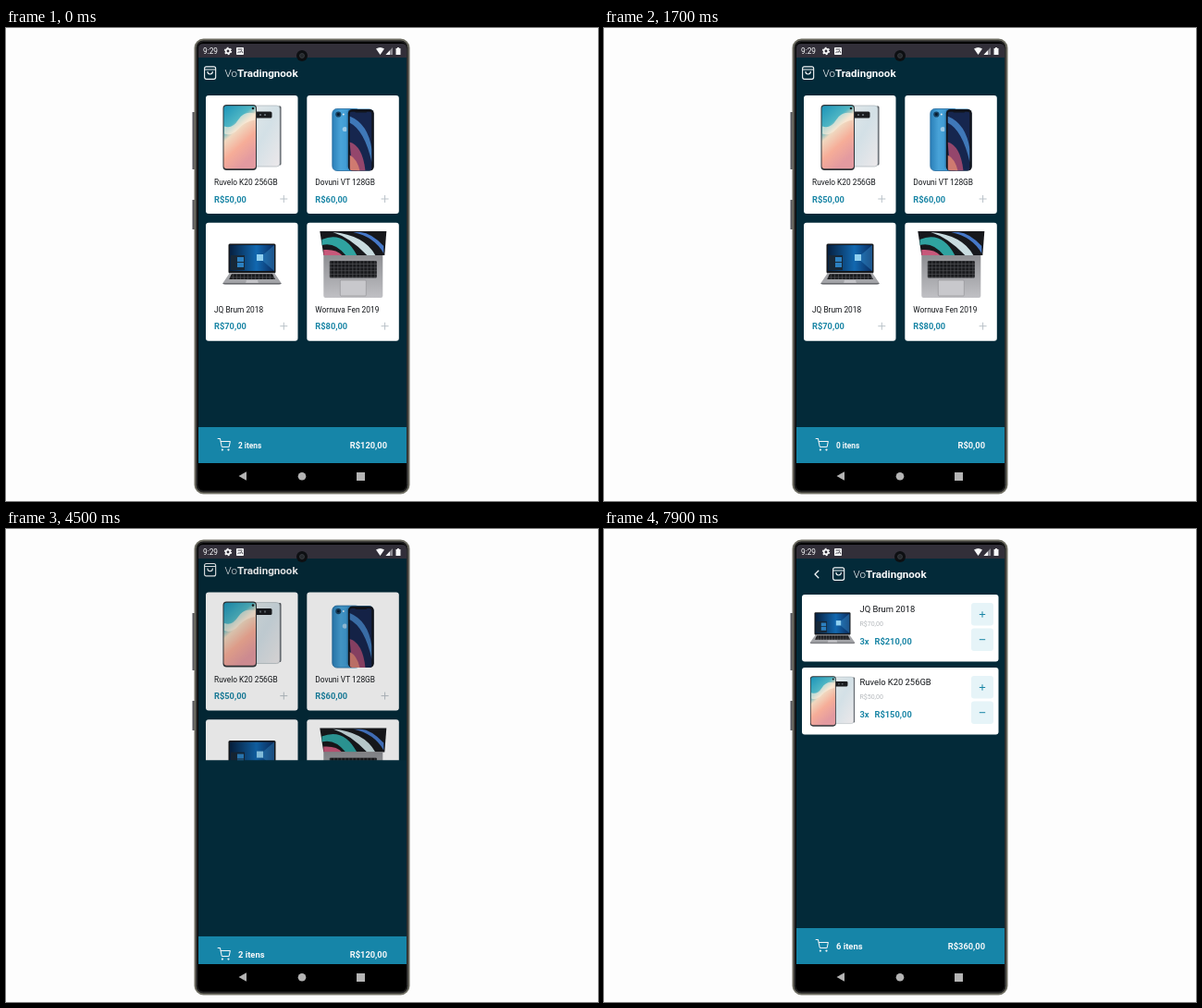
Write an HTML page that moves like this. It is 640 px wide and 512 px high and loops after 8 s.

```html
<!DOCTYPE html>
<html lang="pt-BR">
<head>
<meta charset="utf-8">
<title>Loja</title>
<style>
  html, body { margin: 0; width: 100%; height: 100%; overflow: hidden; background: #fdfdfd; }
  svg { display: block; width: 640px; height: 512px; font-family: Roboto, "Liberation Sans", sans-serif; }
  .icon { fill: none; stroke: #f3f5f7; stroke-width: 1.7; stroke-linecap: round; stroke-linejoin: round; }
  .bold { font-weight: 700; font-size: 9.3px; }
  .price { fill: #1985a5; }
  .light { fill: #f8f9fa; }
  .name { fill: #111418; font-size: 8.35px; }
  .paper { fill: #fff; }
</style>
</head>
<body>
<svg viewBox="0 0 640 512" xmlns="http://www.w3.org/2000/svg">
  <defs>
    <clipPath id="screenClip"><rect x="208" y="32" width="225" height="439"/></clipPath>
    <clipPath id="revealClip"><rect id="reveal" x="208" width="225" height="439"/></clipPath>
    <linearGradient id="beach" x1="0" y1="0" x2=".45" y2="1">
      <stop offset="0" stop-color="#1b93b8"/><stop offset=".34" stop-color="#4fb6c4"/>
      <stop offset=".48" stop-color="#f0d8c0"/><stop offset=".72" stop-color="#f6ad98"/>
      <stop offset="1" stop-color="#e39aa0"/>
    </linearGradient>
    <linearGradient id="pearl" x1="0" y1="0" x2="1" y2="1">
      <stop offset="0" stop-color="#e3e9ea"/><stop offset=".5" stop-color="#d3e0e6"/><stop offset="1" stop-color="#ece8ea"/>
    </linearGradient>
    <linearGradient id="azure" x1="0" x2="1">
      <stop offset="0" stop-color="#2a7fb8"/><stop offset=".3" stop-color="#49a3d8"/><stop offset="1" stop-color="#2c8ac8"/>
    </linearGradient>
    <linearGradient id="desk" x1="0" x2="1">
      <stop offset="0" stop-color="#062040"/><stop offset=".6" stop-color="#1268b0"/><stop offset="1" stop-color="#0a2c60"/>
    </linearGradient>
    <linearGradient id="silver" x1="0" x2="0" y1="0" y2="1">
      <stop offset="0" stop-color="#8d8e92"/><stop offset="1" stop-color="#c0c0c4"/>
    </linearGradient>
    <pattern id="keys" width="4" height="3.6" patternUnits="userSpaceOnUse">
      <rect width="4" height="3.6" fill="#55565a"/><rect width="3.4" height="3" fill="#18191c"/>
    </pattern>
    <clipPath id="glassClip"><rect x="5" y="-29" width="24" height="64" rx="3"/></clipPath>
    <clipPath id="lidClip"><rect x="-34" y="-35" width="68" height="25"/></clipPath>

    <!-- products, centred on the origin -->
    <g id="twoPhones">
      <path d="M29 -34 h1.5 q1 0 1 2 v60 q0 2 -1 2 h-1.5z" fill="#555a60"/>
      <rect x="-5" y="-34.5" width="35" height="66" rx="3.5" fill="url(#pearl)" stroke="#a9b3b8" stroke-width=".7"/>
      <rect x="0" y="-28" width="21.5" height="7" rx="1.5" fill="#191b1e"/>
      <path d="M3 -24.5h2M8 -24.5h2M13 -24.5h2" stroke="#5d646a" stroke-width="2"/>
      <rect x="-31.5" y="-35.5" width="36.5" height="71" rx="4" fill="#303438"/>
      <rect x="-30.5" y="-34.3" width="34.5" height="68" rx="3" fill="url(#beach)"/>
      <path d="M-30 -12 q9 3 15 -7 t18 -7 v7 q-11 2 -18 10 t-15 5z" fill="#fff0de" opacity=".65"/>
      <circle cx="1" cy="-31.5" r="1.3" fill="#182024"/>
    </g>
    <g id="bluePhone">
      <rect x="-22.5" y="-32" width="30" height="67" rx="5" fill="url(#azure)" stroke="#23699c" stroke-width=".8"/>
      <circle cx="-16" cy="-26" r="3.1" fill="#17405f"/><circle cx="-16" cy="-26" r="1.4" fill="#081a2c"/>
      <circle cx="-10.5" cy="-26" r="1" fill="#e4edf2"/>
      <circle cx="-9" cy="-10" r="2.6" fill="#9ccbe8"/>
      <rect x="-7" y="-32" width="29" height="67" rx="5" fill="#3789c0"/>
      <rect x="-5.5" y="-31.5" width="28" height="66.5" rx="4.5" fill="#11141c"/>
      <g transform="translate(-8.8 0)" clip-path="url(#glassClip)">
        <rect x="5" y="-29" width="24" height="64" fill="#16264e"/>
        <path d="M5 -24 q20 8 24 36 v14 q-8 -35 -24 -43z" fill="#3f78b8"/>
        <path d="M5 4 q14 4 17 31 H8z" fill="#94466c"/>
        <path d="M5 18 q8 4 11 17 H5z" fill="#cf7a70"/>
      </g>
      <rect x="2" y="-31" width="13" height="3" rx="1.5" fill="#11141c"/>
    </g>
    <g id="laptop">
      <rect x="-25.5" y="-22.5" width="51" height="32" rx="1.5" fill="#15181c"/>
      <rect x="-24" y="-21" width="48" height="28" fill="url(#desk)"/>
      <path d="M8 -7 L24 -21 V7z" fill="#43a4e0" opacity=".35"/>
      <rect x="5" y="-11" width="7" height="7" fill="#8fd0f0"/>
      <rect x="-23" y="-10" width="15" height="16" fill="#172838"/>
      <path d="M-16 -8h7v5h-7zm0 6h7v5h-7z" fill="#2c80c0"/>
      <path d="M-24 9 H24 L31.5 20 Q31.5 22 29 22 H-29 Q-31.5 22 -31.5 20z" fill="#a3a4a8"/>
      <path d="M-22 10 H22 L25 16 H-25z" fill="url(#keys)"/>
      <path d="M-6 17h12l1 3.5H-7z" fill="#c4c4c8"/>
      <path d="M-31.5 20.5h63" stroke="#66686c"/>
    </g>
    <g id="bigLaptop">
      <path d="M-36 -36 H36 L34 -10 H-32z" fill="#17181c"/>
      <g clip-path="url(#lidClip)">
        <path d="M-34 -27 Q-10 -37 4 -10 H-8 Q-20 -25 -34 -21z" fill="#2fa3a0"/>
        <path d="M-22 -35 Q12 -32 24 -10 H15 Q-3 -29 -22 -35z" fill="#c9dce0"/>
        <path d="M0 -35 Q23 -30 33 -12 V-20 Q20 -34 8 -35z" fill="#4678c8"/>
        <path d="M-32 -16 Q-18 -17 -12 -10 H-32z" fill="#c8587a"/>
      </g>
      <path d="M-32 -10 H32 V34 Q32 36 30 36 H-30 Q-32 36 -32 34z" fill="url(#silver)"/>
      <rect x="-25.5" y="-4" width="51" height="18.5" rx="1" fill="url(#keys)"/>
      <rect x="-14" y="17" width="28" height="17" rx="1" fill="#c8c8cc" stroke="#8d8e92" stroke-width=".6"/>
    </g>

    <g id="bag" class="icon">
      <path d="M6 2 H18 Q21 2 21 5 V19 Q21 22 18 22 H6 Q3 22 3 19 V5 Q3 2 6 2z M3 6.5 H21 M16 10 a4 4 0 0 1 -8 0"/>
    </g>
    <g id="trolley" class="icon">
      <circle cx="9" cy="21" r="1"/><circle cx="20" cy="21" r="1"/>
      <path d="M1 1h4l2.7 13.4a2 2 0 0 0 2 1.6h9.7a2 2 0 0 0 2-1.6L23 6H6"/>
    </g>
  </defs>

  <rect width="640" height="512" fill="#fdfdfd"/>
  <path d="M201.5 91h3v62h-3zM201.5 186h3v32h-3z" fill="#5a5a60"/>
  <rect x="204.5" y="12.5" width="231" height="491" rx="9" fill="#151517" stroke="#6e6d62" stroke-width="2"/>
  <rect x="206.7" y="14.7" width="226.8" height="486.5" rx="6.5" fill="#000" stroke="#2c2c2c"/>

  <g clip-path="url(#screenClip)">
    <g id="home"></g>
    <rect id="shade" x="208" y="32" width="225" height="439" fill="#000"/>
    <g clip-path="url(#revealClip)"><g id="cart"></g></g>
  </g>

  <path d="M208 32 V22 Q208 17 213 17 H428 Q433 17 433 22 V32z" fill="#322f39"/>
  <g class="light">
    <text x="213" y="28" font-size="8.3">9:29</text>
    <circle cx="240" cy="25" r="2.3" fill="none" stroke="#f8f9fa" stroke-width="1.7"/>
    <circle cx="240" cy="25" r="3.6" fill="none" stroke="#f8f9fa" stroke-width="1.2" stroke-dasharray="1.9"/>
    <rect x="249" y="21" width="8" height="8" rx=".8"/>
    <path d="M250.5 23h5M250.5 27l1.5-1.5 1 1 1.5-2 1.5 2.5" fill="none" stroke="#322f39" stroke-width=".9"/>
    <path d="M400 22.5 Q404.5 19.5 409 22.5 L404.5 29z"/>
    <path d="M410.5 29 L418 21 V29z" opacity=".45"/><path d="M410.5 29 L415 24.2 V29z"/>
    <path d="M421.5 22 h1.4 v-1 h2.2 v1 h1.4 v7 h-5z"/>
  </g>
  <circle cx="320" cy="30" r="6" fill="#0d0f12"/>
  <circle cx="320" cy="30" r="2.5" fill="#24282c" stroke="#404448" stroke-width=".7"/>
  <path d="M251.5 485 L260 480.3 V489.7z M379 481h9v9h-9z" fill="#b4b4b4"/>
  <circle cx="320" cy="485.3" r="4.3" fill="#b4b4b4"/>
</svg>
<script>
const LOOP = 8000, STEP = 100, TOP = 32, HEIGHT = 439, OPEN_AT = 4441, OPEN_MS = 425;
const PRODUCTS = [
  { name: "Ruvelo K20 256GB", price: 50, art: "twoPhones", y: 118.5 },
  { name: "Dovuni VT 128GB", price: 60, art: "bluePhone", y: 119.5 },
  { name: "JQ Brum 2018", price: 70, art: "laptop", y: 256 },
  { name: "Wornuva Fen 2019", price: 80, art: "bigLaptop", y: 256 }
];
const LEFTOVER_END = 100;
const PHONE = 0, LAPTOP = 2;
const TAPS = [
  { at: 2200, product: LAPTOP }, { at: 3000, product: PHONE },
  { at: 5680, product: PHONE }, { at: 6290, product: PHONE },
  { at: 6880, product: LAPTOP }, { at: 7360, product: LAPTOP }
];

const byId = id => document.getElementById(id);
const clamp = v => Math.max(0, Math.min(1, v));
const money = v => `R$${v},00`;
const cross = (x, y, r, color) => `<path d="M${x - r} ${y}h${2 * r}M${x} ${y - r}v${2 * r}" stroke="${color}" fill="none"/>`;
const header = x => `<rect x="208" y="32" width="225" height="439" fill="#032a39"/>
  <use href="#bag" transform="translate(${x} 40.6) scale(.67)"/>
  <text class="light" x="${x + 24}" y="53" font-size="11.6"><tspan font-weight="300">Vo</tspan><tspan font-weight="700">Tradingnook</tspan></text>`;
const footer = (key, size) => `<rect x="208" y="432" width="225" height="45" fill="#1685a8"/>
  <use href="#trolley" transform="translate(228.5 444) scale(.6)"/>
  <text id="${key}Count" class="bold light" x="251" y="455" style="font-size:${size}px"></text>
  <text id="${key}Total" class="bold light" x="412" y="455" text-anchor="end"></text>`;

function tile(p, i) {
  const x = 216 + (i % 2) * 109.3, y = 73 + (i > 1) * 137.7;
  return `<rect class="paper" x="${x}" y="${y}" width="99.5" height="128" rx="3"/>
    <use href="#${p.art}" transform="translate(${x + 50} ${p.y})"/>
    <text class="name" x="${x + 9}" y="${y + 97}">${p.name}</text>
    <text class="bold price" x="${x + 9}" y="${y + 115.5}">${money(p.price)}</text>
    <g id="add${i}">${cross(x + 84.3, y + 112, 4, "#b9c2c8")}</g>`;
}

function row(i, y) {
  const p = PRODUCTS[i];
  return `<rect class="paper" x="214" y="${y}" width="212.5" height="72.5" rx="3"/>
    <use href="#${p.art}" transform="translate(247 ${y + 36.5}) scale(.765)"/>
    <text class="name" x="276.5" y="${y + 19}" style="font-size:9.4px">${p.name}</text>
    <text x="276.5" y="${y + 34}" font-size="7" fill="#b4b8bc">${money(p.price)}</text>
    <text id="qty${i}" class="bold price" x="276.5" y="${y + 53.7}"></text>
    <text id="sum${i}" class="bold price" x="292.5" y="${y + 53.7}"></text>
    <g id="more${i}"><rect x="397" y="${y + 9}" width="24" height="24.5" rx="3" fill="#e6f4f8"/>${cross(409, y + 21.5, 3.2, "#1985a5")}</g>
    <rect x="397" y="${y + 36.5}" width="24" height="24.5" rx="3" fill="#e6f4f8"/>
    <path d="M405.8 ${y + 48.7}h6.4" stroke="#1985a5"/>`;
}

byId("home").innerHTML = header(212.6) + PRODUCTS.map(tile).join("") + footer("home", 8.3);
byId("cart").innerHTML = header(245.6) +
  `<path class="icon" style="stroke-width:1.3" d="M231.8 45.2 L228 49 L231.8 52.8"/>` +
  row(LAPTOP, 71) + row(PHONE, 150) + footer("cart", 9.4);

// cubic-bezier(x1, y1, x2, y2), solved for x by bisection
function bezier(x, x1, y1, x2, y2) {
  if (x <= 0 || x >= 1) return clamp(x);
  const curve = (a, b, s) => 3 * (1 - s) ** 2 * s * a + 3 * (1 - s) * s * s * b + s ** 3;
  let lo = 0, hi = 1;
  for (let i = 0; i < 24; i++) {
    const mid = (lo + hi) / 2;
    if (curve(x1, x2, mid) < x) lo = mid; else hi = mid;
  }
  return curve(y1, y2, lo);
}

// button dims while held, then recovers after release
function pressOpacity(t, product, inCart) {
  return TAPS.filter(tap => tap.product === product && (tap.at > OPEN_AT) === inCart)
    .reduce((value, { at }) => {
      const dim = t < at ? clamp((t - at + 150) / 130) : 1 - clamp((t - at - 20) / 230);
      return Math.min(value, 1 - .8 * dim);
    }, 1);
}

function render(t) {
  const quantity = PRODUCTS.map((_, i) => TAPS.filter(tap => tap.product === i && tap.at <= t).length);
  if (t < LEFTOVER_END) quantity[PHONE] = quantity[LAPTOP] = 1;
  const count = quantity.reduce((a, b) => a + b);
  const total = quantity.reduce((sum, n, i) => sum + n * PRODUCTS[i].price, 0);
  for (const key of ["home", "cart"]) {
    byId(key + "Count").textContent = `${count} itens`;
    byId(key + "Total").textContent = money(total);
  }
  for (const i of [PHONE, LAPTOP]) {
    byId("qty" + i).textContent = `${quantity[i]}x`;
    byId("sum" + i).textContent = money(quantity[i] * PRODUCTS[i].price);
    byId("add" + i).setAttribute("opacity", pressOpacity(t, i, false));
    byId("more" + i).setAttribute("opacity", pressOpacity(t, i, true));
  }
  const p = bezier((t - OPEN_AT) / OPEN_MS, .20833, .82, .25, 1), rest = HEIGHT * (1 - p);
  byId("home").setAttribute("transform", `translate(0 ${-.02 * HEIGHT * p})`);
  byId("shade").setAttribute("opacity", .1 * clamp(p / .36));
  byId("reveal").setAttribute("y", TOP + rest);
  byId("cart").setAttribute("transform", `translate(0 ${.041 * rest})`);
}

const start = performance.now();
function tick() {
  const t = (performance.now() - start) % LOOP;
  render(Math.floor(t / STEP) * STEP);
  requestAnimationFrame(tick);
}
tick();
</script>
</body>
</html>
```
